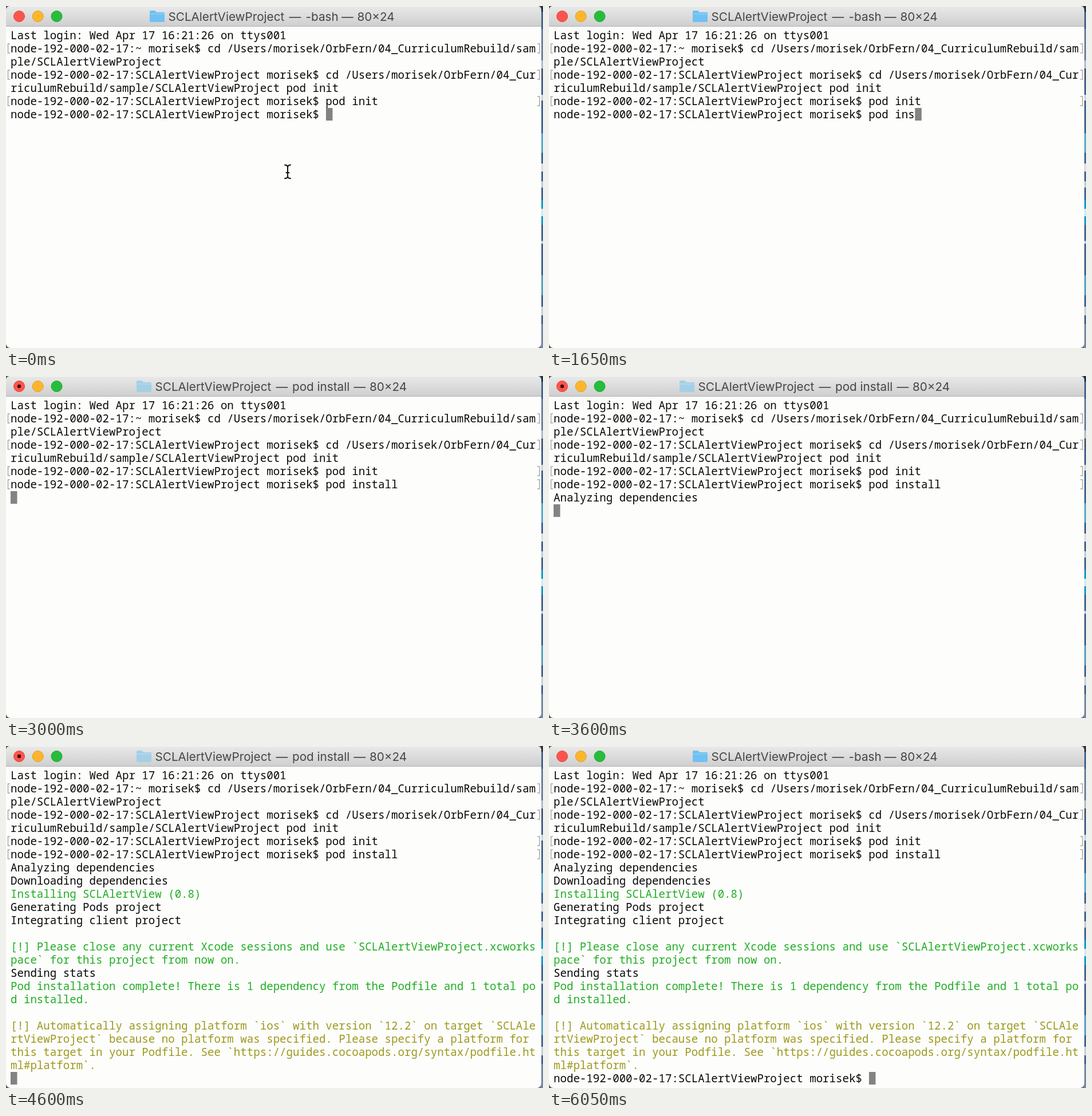
An HTML page that plays this animation: 938x597 px, repeating every 6100 ms.

```html
<!DOCTYPE html>
<html lang="en">
<head>
<meta charset="utf-8">
<title>Terminal</title>
<style>
  html, body { margin: 0; width: 100%; height: 100%; overflow: hidden; background: #fdfdfc; }
  svg { display: block; width: 938px; height: 597px; }
  text { white-space: pre; }
  .mono { font: 500 19.13px "Noto Sans Mono", "DejaVu Sans Mono", monospace; }
  .title { font: 400 20.7px Inter, Roboto, sans-serif; fill: #464646; }
  .mark { fill: none; stroke: #a9a9a9; stroke-width: 1.5; }
</style>
</head>
<body>
<svg id="stage" viewBox="0 0 938 597" xmlns="http://www.w3.org/2000/svg">
  <defs>
    <linearGradient id="bar" x2="0" y2="1">
      <stop offset="0" stop-color="#e9e9e9"/>
      <stop offset="1" stop-color="#cecece"/>
    </linearGradient>
  </defs>
  <rect width="938" height="597" fill="#47678f"/>
  <g id="desktop"></g>
  <path d="M0 0H10L0 10ZM0 597V587L10 597Z" fill="#55564a"/>
  <rect width="935" height="597" rx="8" fill="#fdfdfc"/>
  <path d="M0 36V8Q0 0 8 0H927Q935 0 935 8V36Z" fill="url(#bar)"/>
  <path d="M6 .5H929" stroke="#f5f5f5"/>
  <path d="M0 35.5H935" stroke="#b2b2b2"/>
  <g stroke-width="1">
    <circle cx="23" cy="18" r="9.5" fill="#fc544c" stroke="#e0443e"/>
    <circle cx="55.7" cy="18" r="9.5" fill="#fdb62b" stroke="#dfa023"/>
    <circle cx="88.5" cy="18" r="9.5" fill="#27bd3b" stroke="#1ca62e"/>
  </g>
  <circle id="busyDot" cx="23" cy="18" r="3.2" fill="#4a0805"/>
  <g id="titles"></g>
  <g id="screen"></g>
  <rect id="caret" width="11.5" height="22" fill="#838383"/>
  <g id="pointer" fill="none" stroke-linecap="round">
    <path d="M487 277.5Q492 277.5 492 282V297Q492 301 487 301M497 277.5Q492 277.5 492 282M492 297Q492 301 497 301M489.5 291H494.5" stroke="#fff" stroke-width="4"/>
    <path d="M487 277.5Q492 277.5 492 282V297Q492 301 487 301M497 277.5Q492 277.5 492 282M492 297Q492 301 497 301M489.5 291H494.5" stroke="#111" stroke-width="2"/>
  </g>
</svg>
<script>
const LOOP = 6100, LEFT = 8, TOP = 40, CELL = 11.478, ROW = 23;
const BLACK = "#080808", GREEN = "#20ad24", OLIVE = "#9c991d";
const HOST = "node-192-000-02-17", USER = "morisek";
const PROMPT = `${HOST}:SCLAlertViewProject ${USER}$ `;
const PATH = `/Users/${USER}/OrbFern/04_Cur`;
const COMMAND = "pod install";
const KEY_TIMES = [800, 900, 1000, 1100, 1200, 1300, 1450, 1700, 1800, 1900, 1950];
const ENTER = 2300, BUSY = 2400, DONE = 4800;
const COMMAND_ROW = 6, LAST_ROW = 23;

// Each entry: time of appearance, text, colour.
const OUTPUT = [
  [3450, "Analyzing dependencies"],
  [3800, "Downloading dependencies"],
  [4050, "Installing SCLAlertView (0.8)", GREEN],
  [4300, "Generating Pods project"],
  [4400, "Integrating client project"],
  [4500, ""],
  [4500, "[!] Please close any current Xcode sessions and use `SCLAlertViewProject.xcworks", GREEN],
  [4500, "pace` for this project from now on.", GREEN],
  [4500, "Sending stats"],
  [4600, "Pod installation complete! There is 1 dependency from the Podfile and 1 total po", GREEN],
  [4600, "d installed.", GREEN],
  [4600, ""],
  [4600, "[!] Automatically assigning platform `ios` with version `12.2` on target `SCLAle", OLIVE],
  [4600, "rtViewProject` because no platform was specified. Please specify a platform for ", OLIVE],
  [4600, "this target in your Podfile. See `https://guides.cocoapods.org/syntax/podfile.ht", OLIVE],
  [4600, "ml#platform`.", OLIVE],
  [DONE, PROMPT]
];

const byId = id => document.getElementById(id);
const screen = byId("screen"), caret = byId("caret");

function add(parent, tag, attrs, content = "") {
  const node = document.createElementNS("http://www.w3.org/2000/svg", tag);
  for (const key in attrs) node.setAttribute(key, attrs[key]);
  node.textContent = content;
  parent.appendChild(node);
  return node;
}

function line(row, content, fill = BLACK) {
  return add(screen, "text", { class: "mono", x: LEFT, y: TOP + row * ROW + 17.5, fill }, content);
}

function bracket(row, right) {
  const y = TOP + row * ROW + 3;
  const d = right ? `M928 ${y}H932V${y + 16}H928` : `M7 ${y}H3.5V${y + 16}H7`;
  return add(screen, "path", { class: "mark", d });
}

function title(x, name, nameX, dashX, sizeX, folder) {
  const group = add(byId("titles"), "g", {});
  add(group, "path", { fill: folder, d: `M${x} 10Q${x} 8 ${x + 2} 8H${x + 9}L${x + 12} 11H${x + 24}Q${x + 26} 11 ${x + 26} 13V26Q${x + 26} 28 ${x + 24} 28H${x + 2}Q${x} 28 ${x} 26Z` });
  add(group, "path", { d: `M${x + 1} 14H${x + 25}`, stroke: "#fff", "stroke-opacity": .35 });
  const parts = [["SCLAlertViewProject", x + 32.5], ["—", x + 243.5], [name, nameX], ["—", dashX], ["80×24", sizeX]];
  for (const [content, left] of parts) add(group, "text", { class: "title", x: left, y: 26 }, content);
  return group;
}

const show = (node, on) => node.setAttribute("visibility", on ? "visible" : "hidden");

// Sliver of desktop beside the window: top, height, colour.
for (const [y, height, fill] of [
  [0, 10, "#30343d"], [40, 55, "#6d839d"], [95, 14, "#b6bdc5"], [109, 22, "#4a6079"],
  [155, 10, "#cbd3dc"], [222, 34, "#5aa9cf"], [275, 14, "#d7dce2"], [306, 11, "#c0cad5"],
  [338, 44, "#169bc7"], [354, 13, "#cfe7f0"], [410, 5, "#c6d0da"], [470, 35, "#5aa1c3"],
  [525, 15, "#c7cfd8"], [555, 42, "#7888a0"]
]) add(byId("desktop"), "rect", { x: 934, y, width: 4, height, fill });

const bashTitle = title(251, "-bash", 523.5, 586, 613.5, "#6fc1f3");
const podTitle = title(228, "pod install", 500, 607.5, 635, "#a3d0e8");

[
  "Last login: Wed Apr 17 16:21:26 on ttys001",
  `${HOST}:~ ${USER}$ cd ${PATH}riculumRebuild/sam`,
  "ple/SCLAlertViewProject",
  `${PROMPT}cd ${PATH}`,
  "riculumRebuild/sample/SCLAlertViewProject pod init",
  `${PROMPT}pod init`
].forEach((content, row) => line(row, content));
for (const row of [1, 3, 5]) { bracket(row, false); bracket(row, true); }

const commandLine = line(COMMAND_ROW, PROMPT);
const commandMarks = [bracket(COMMAND_ROW, false), bracket(COMMAND_ROW, true)];
const outputLines = OUTPUT.map(([, content, fill], i) => line(COMMAND_ROW + 1 + i, content, fill));

function draw(time) {
  const typed = KEY_TIMES.filter(at => time >= at).length;
  const busy = time >= BUSY && time < DONE;
  const printed = OUTPUT.filter(([at]) => time >= at).length;
  let row = COMMAND_ROW, column = PROMPT.length + typed;
  if (time >= ENTER) {
    row = Math.min(COMMAND_ROW + 1 + printed, LAST_ROW);
    column = time >= DONE ? PROMPT.length : 0;
  }
  commandLine.textContent = PROMPT + COMMAND.slice(0, typed);
  commandMarks.forEach(mark => show(mark, time >= ENTER));
  outputLines.forEach((node, i) => show(node, i < printed));
  show(bashTitle, !busy);
  show(podTitle, busy);
  show(byId("busyDot"), busy);
  show(byId("pointer"), typed === 0);
  caret.setAttribute("x", LEFT + column * CELL);
  caret.setAttribute("y", TOP + row * ROW);
}

const start = performance.now();
function tick() {
  draw((performance.now() - start) % LOOP);
  requestAnimationFrame(tick);
}
draw(0);
requestAnimationFrame(tick);
</script>
</body>
</html>
```
